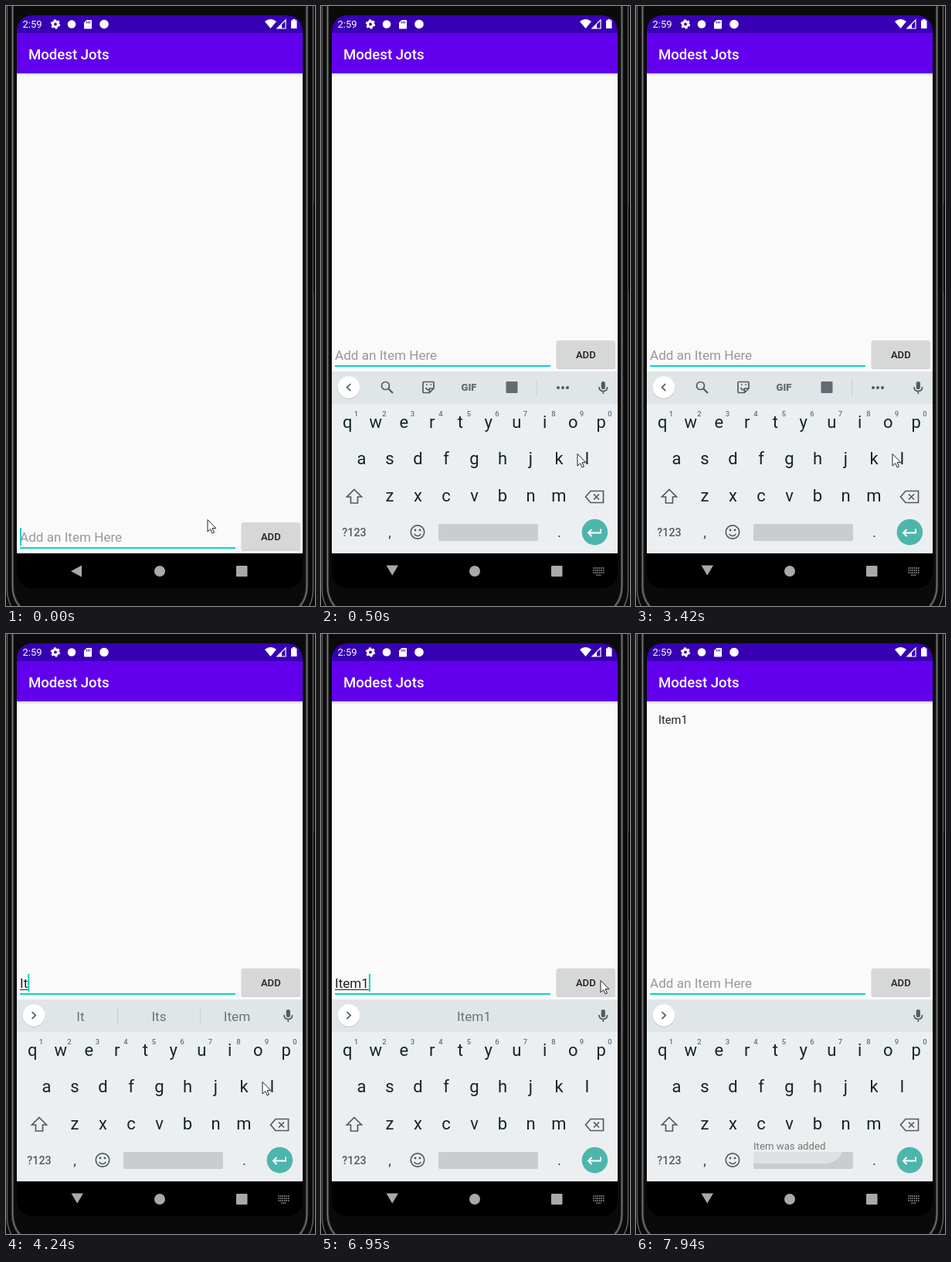
Animation of 400x775 px, one loop 8000 ms. Source, as an HTML page:

```html
<!DOCTYPE html>
<html lang="en">
<head>
<meta charset="utf-8">
<title>Todo list demo</title>
<style>
  html, body { margin: 0; width: 100%; height: 100%; overflow: hidden; background: #0a0a0a; }
  svg { display: block; width: 100vw; height: 100vh; }
  text { font-family: Roboto, sans-serif; white-space: pre; }
  .mid { text-anchor: middle; }
  .line { fill: none; stroke: #505c62; stroke-width: 1.7; }
</style>
</head>
<body>
<svg viewBox="0 0 400 775" xmlns="http://www.w3.org/2000/svg">
  <defs>
    <clipPath id="screen"><rect x="14" y="12" width="370" height="740" rx="20"/></clipPath>
    <clipPath id="btn"><rect x="305" y="432" width="75.5" height="35.5" rx="2"/></clipPath>
    <linearGradient id="fade" x2="0" y2="1">
      <stop stop-color="#000" stop-opacity=".14"/><stop offset="1" stop-color="#000" stop-opacity="0"/>
    </linearGradient>
  </defs>

  <rect width="400" height="775" fill="#0a0a0a"/>
  <g fill="none">
    <rect x="1.5" y="-60" width="396" height="860" rx="46" stroke="#606060" stroke-width="1.5"/>
    <rect x="8.500" y="-60" width="381" height="850" rx="40" stroke="#333" stroke-width="3.500"/>
    <rect x="8.500" y="-60" width="381" height="850" rx="40" stroke="#777" stroke-width="1.300"/>
    <path d="M399 255v115" stroke="#000" stroke-width="2"/>
  </g>

  <g clip-path="url(#screen)">
    <rect x="14" y="12" width="370" height="740" fill="#000"/>
    <rect x="14" y="87" width="370" height="620" fill="#fafafa"/>
    <rect x="14" y="87" width="370" height="4" fill="url(#fade)"/>
    <rect x="14" y="35" width="370" height="52" fill="#6200ee"/>
    <rect x="14" y="12" width="370" height="23" fill="#3700b3"/>

    <g fill="#fff">
      <text x="21.5" y="28" font-size="13">2:59</text>
      <text x="29" y="68.5" font-size="18.6" font-weight="500">Modest Jots</text>
      <circle cx="64" cy="23.5" r="3.4" fill="none" stroke="#fff" stroke-width="3"/>
      <circle cx="64" cy="23.5" r="5.2" fill="none" stroke="#fff" stroke-width="2" stroke-dasharray="2.7 2.745"/>
      <circle cx="85" cy="23.5" r="5.3"/>
      <path d="M104.500 18h5.500q1 0 1 1v9.500q0 1-1 1h-8q-1 0-1-1v-7z"/>
      <path d="M104.500 20v2.500m2-2.500v2.500m2-2.500v2.500" stroke="#3700b3"/>
      <circle cx="127" cy="23.500" r="5.800"/>
      <path d="M335 20q7.500-5.800 15 0l-7.500 9z"/>
      <path d="M362 18v11h-11z" fill="none" stroke="#fff" stroke-width="1.200"/>
      <path d="M357 23.500v5.500h-5.500z"/>
      <path d="M371 17h3.500v1.500h2v10.500h-7.500v-10.500h2z"/>
    </g>
    <text id="item" x="29" y="116" font-size="14.700" fill="#212121">Item1</text>

    <g id="row">
      <text id="entry" x="18" y="457" font-size="17.100"></text>
      <rect id="under" x="18" y="459" height="1" fill="#222"/>
      <rect x="18" y="464" width="279" height="2" fill="#0bd3c1"/>
      <rect id="caret" y="439" width="2" height="23" fill="#0bd3c1"/>
      <rect id="shadow" x="304.500" y="433" width="76.500" rx="2.500" fill="#000" opacity=".16"/>
      <rect x="305" y="432" width="75.500" height="35.500" rx="2" fill="#d6d7d7"/>
      <circle id="ripple" cx="361" cy="447" fill="#000" opacity=".1" clip-path="url(#btn)"/>
      <text class="mid" x="342.800" y="454.700" font-size="13.100" font-weight="500" fill="#212121">ADD</text>
    </g>

    <g fill="#a9a9a9">
      <path id="back"/>
      <circle cx="199" cy="730" r="7"/>
      <rect x="298" y="723" width="14.500" height="14" rx="1"/>
      <path id="ime" d="M352.500 726h14m-14 3h14m-14 3h14m-10 3h6" stroke="#a9a9a9" stroke-width="1.300" stroke-dasharray="1.500 1"/>
    </g>

    <g id="board">
      <rect x="14" y="472" width="370" height="235" fill="#eceff1"/>
      <rect x="14" y="472" width="370" height="42" fill="#e0e5e8"/>
      <circle cx="36" cy="493.300" r="14.500" fill="#000" opacity=".14"/>
      <circle cx="36" cy="492.500" r="14.300" fill="#fff"/>
      <path id="arrow" class="line"/>
      <g id="tools">
        <circle class="line" cx="83.500" cy="490.500" r="5"/>
        <path class="line" d="M87.500 494.500l5.500 5.500" style="stroke-width:2.200"/>
        <path class="line" d="M133 485.500h12q1 0 1 1v7.500l-5.500 5.500h-7.500q-1 0-1-1v-12q0-1 1-1zM146 494h-5.500v5.500M135.500 493q2 4 5 2M136 489h1.800m3.500 0h1.800"/>
        <text class="mid" x="191.500" y="497" font-size="13" font-weight="900" fill="#616c72">GIF</text>
        <rect x="239.500" y="485" width="15" height="15" rx="1" fill="#616c72"/>
        <path d="M279.500 482v22" stroke="#cbd1d4"/>
        <g fill="#505c62"><circle cx="307" cy="493" r="2"/><circle cx="313" cy="493" r="2"/><circle cx="319" cy="493" r="2"/></g>
      </g>
      <g id="tips"></g>
      <path id="bars" d="M144.500 482v22M251.500 482v22" stroke="#c6ccd0"/>
      <rect x="362.700" y="485" width="5.200" height="10" rx="2.600" fill="#505c62"/>
      <path class="line" d="M360 492q0 5.500 5.300 5.500t5.300-5.500M365.300 497.500v3.500"/>
      <g id="keys"></g>
      <path class="line" d="M43 624.500l9.500 9.500h-5v8h-9v-8h-5z"/>
      <path class="line" d="M349 626.500h16.500v15h-16.500l-6.500-7.500zM353 630.500l7 7m0-7l-7 7"/>
      <circle class="line" cx="125" cy="679.500" r="8.700"/>
      <path class="line" d="M120.500 682q4.500 5 9 0"/>
      <circle cx="122" cy="677" r="1.400" fill="#505c62"/><circle cx="128" cy="677" r="1.400" fill="#505c62"/>
      <rect x="152" y="669" width="129" height="22" rx="2" fill="#c9cdd0"/>
      <circle cx="354.400" cy="679.600" r="16.800" fill="#4db6ac"/>
      <path d="M362 675.500v5h-16m4.500-4.500l-4.500 4.500 4.500 4.500" fill="none" stroke="#fff" stroke-width="1.900"/>
    </g>

    <g id="toast">
      <rect x="130" y="640" width="138" height="44" rx="22" fill="#eee"/>
      <text x="152" y="666" font-size="13.200" fill="#222">Item was added</text>
    </g>
  </g>
  <path id="mouse" d="M.5 .5v15.500l3.600-3.400 2.500 5.400 2.400-1.100-2.500-5.200h4.900z" fill="#fff" stroke="#222" stroke-width="1"/>
</svg>

<script>
const $ = id => document.getElementById(id);
const LOOP = 8000;
const HINT = 'Add an Item Here';
const EM = 17.1;

const label = (x, y, size, str, fill, extra = '') =>
  `<text class="mid" x="${x}" y="${y}" font-size="${size}" fill="${fill}" ${extra}>${str}</text>`;

function buildKeys() {
  const step = 36.5, rows = [['qwertyuiop', 34.3, 545], ['asdfghjkl', 52.5, 592], ['zxcvbnm', 89, 640]];
  let out = '';
  for (const [chars, x0, y] of rows)
    [...chars].forEach((c, i) => out += label(x0 + i * step, y, 22, c, '#14252c'));
  for (let i = 0; i < 10; i++)
    out += label(45.5 + i * step, 530, 9.5, (i + 1) % 10, '#66727a', 'font-weight="500"');
  out += label(43, 685, 14.3, '?123', '#505c62', 'font-weight="500"');
  out += label(89, 686, 19, ',', '#37474f') + label(308.5, 686, 19, '.', '#37474f');
  $('keys').innerHTML = out;
}

// Each entry changes only the listed properties from its time on.
const steps = [
  [0, { mouse: [260.5, 663], open: 0, rise: 0, alpha: 0, text: '', caret: 1, tips: null, ripple: 0, toast: 0, item: 0 }],
  [140, { mouse: [296, 620] }],
  [260, { mouse: [331.5, 578], open: 1, rise: 20, alpha: .5, caret: 0 }],
  [380, { rise: 6, alpha: .86 }],
  [500, { rise: 0, alpha: 1 }],
  [900, { caret: 1 }],
  [1430, { caret: 0 }],
  [1990, { caret: 1 }],
  [2360, { caret: 0 }],
  [2920, { caret: 1 }],
  [3420, { caret: 0 }],
  [3990, { text: 'I', caret: 1, tips: ['I', 'I’m', 'I’ll'] }],
  [4240, { text: 'It', tips: ['It', 'Its', 'Item'] }],
  [4360, { text: 'Item', tips: ['Item', 'Items', 'Itemized'] }],
  [4890, { caret: 0 }],
  [5320, { caret: 1 }],
  [5740, { text: 'Item1', tips: ['', 'Item1', ''] }],
  [6280, { caret: 0 }],
  [6700, { caret: 1, mouse: [340, 541] }],
  [6825, { mouse: [354, 478] }],
  [6950, { mouse: [361.5, 447] }],
  [7230, { ripple: 34 }],
  [7380, { ripple: 56, caret: 0 }],
  [7500, { ripple: 64 }],
  [7650, { mouse: [284.5, 576] }],
  [7800, { mouse: [234, 659], ripple: 0, text: '', tips: ['', '', ''], toast: .3 }],
  [7940, { mouse: null, item: 1, toast: .58 }]
];

function stateAt(t) {
  const s = {};
  for (const [at, change] of steps) if (at <= t) Object.assign(s, change);
  return s;
}

const set = (id, attrs) => { for (const k in attrs) $(id).setAttribute(k, attrs[k]); };
const show = (id, on) => set(id, { opacity: on ? 1 : 0 });

// Advance widths of the typed letters, in em.
const wide = { I: .272, t: .327, e: .53, m: .876, 1: .561 };
const measure = str => [...str].reduce((w, c) => w + wide[c] * EM, 0);

function draw(t) {
  const s = stateAt(t), w = measure(s.text), tips = s.tips || ['', '', ''];
  set('row', { transform: `translate(0 ${s.open ? 0 : 235})` });
  $('entry').textContent = s.text || HINT;
  set('entry', { fill: s.text ? '#212121' : '#989898' });
  set('under', { width: w });
  set('caret', { x: 18 + w, opacity: s.caret });
  set('ripple', { r: s.ripple });
  set('shadow', { height: s.ripple ? 37.5 : 36 });
  set('back', { d: s.open ? 'M84.500 722.500h15.500l-7.750 13z' : 'M98 722.500v15l-14-7.500z' });
  show('ime', s.open);
  set('board', { transform: `translate(0 ${s.rise})`, opacity: s.alpha });
  set('arrow', { d: s.tips ? 'M33.500 488l4.700 4.600-4.700 4.600' : 'M38.300 488l-4.700 4.600 4.700 4.600' });
  show('tools', !s.tips);
  show('bars', tips[0]);
  $('tips').innerHTML = tips.map((tip, i) => label([96.5, 198, 299][i], 499.5, 17.2, tip, '#68757c')).join('');
  set('toast', { opacity: s.toast });
  show('item', s.item);
  show('mouse', s.mouse);
  if (s.mouse) set('mouse', { transform: `translate(${s.mouse})` });
}

buildKeys();
const start = performance.now();
function tick(now) {
  draw(Math.max(0, now - start) % LOOP);
  requestAnimationFrame(tick);
}
draw(0);
requestAnimationFrame(tick);
</script>
</body>
</html>
```
